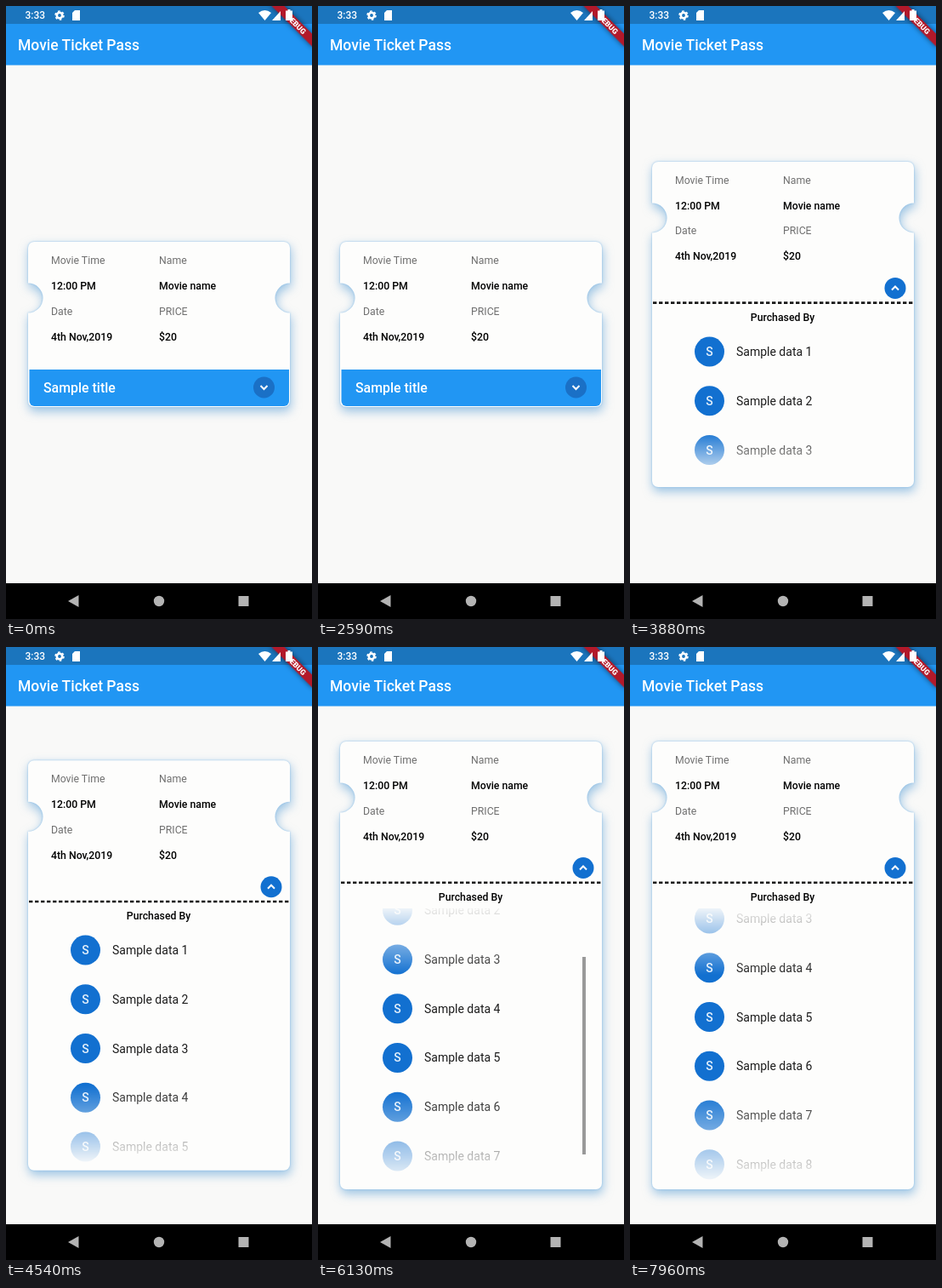
An HTML page that plays this animation: 360x720 px, repeating every 8000 ms.

```html
<!DOCTYPE html>
<html lang="en">
<head>
<meta charset="utf-8">
<title>Movie Ticket Pass</title>
<style>
  html, body { margin: 0; width: 100%; height: 100%; overflow: hidden; background: #f9f9f8; }
  svg { position: absolute; left: 0; top: 0; display: block; }
  text { font: 12.27px Roboto, sans-serif; }
  .label { fill: #707070; }
  .value { fill: #000; font-weight: 500; }
  #list { position: absolute; left: 44px; width: 272px; overflow: hidden; }
  #list text { font-size: 14px; fill: #1c1c1c; }
  #list .initial { fill: #e4f0fb; font-weight: 500; text-anchor: middle; }
  #card { filter: drop-shadow(0 0 1px #8fc0e8) drop-shadow(1px 5px 6px #3f8fd080); }
  #bar, #glow { position: absolute; }
  #bar { left: 310.5px; width: 4.5px; height: 232px; background: #999; }
</style>
</head>
<body>
<svg width="360" height="720" viewBox="0 0 360 720">
  <rect width="360" height="69.500" fill="#2196f3"/>
  <rect width="360" height="21" fill="#1b75bd"/>
  <text x="14" y="52" fill="#fff" style="font-size:17.5px;font-weight:500">Movie Ticket Pass</text>

  <g transform="translate(360 0) rotate(45)">
    <rect x="-35" y="23" width="70" height="10.5" fill="#b3192a" style="filter:drop-shadow(0 0 3px #0008)"/>
    <text x="2" y="31.500" text-anchor="middle" fill="#fff" style="font-size:8.9px;font-weight:900">DEBUG</text>
  </g>

  <g fill="#fff">
    <text x="22.5" y="15" style="font-size:12px;font-weight:500">3:33</text>
    <circle cx="63" cy="11" r="3.2" fill="none" stroke="#fff" stroke-width="2.6"/>
    <circle cx="63" cy="11" r="5" fill="none" stroke="#fff" stroke-width="1.6" stroke-dasharray="2.6 2.636"/>
    <path d="M81 5h6v12h-9V8z"/>
    <path d="M297 8q7.500-6 15 0l-7.500 9z"/>
    <path d="M323 6v11h-10z"/>
    <path d="M331.500 4h3v1.500h2.500V17h-8V5.500h2.500z"/>
  </g>

  <rect y="678" width="360" height="42"/>
  <g fill="#b4b4b4">
    <path d="M73 699l12.500-7v14z"/>
    <circle cx="180" cy="699" r="6.200"/>
    <rect x="273.500" y="693" width="12" height="12"/>
  </g>

  <path id="card" fill="#fdfdfc"/>

  <g id="ticket">
    <g id="info"></g>
    <g id="closed">
      <path d="M27.500 150H333V187a6 6 0 0 1-6 6H33.500a6 6 0 0 1-6-6z" fill="#2196f3"/>
      <text x="44" y="177" fill="#fff" style="font-size:15.9px;font-weight:500">Sample title</text>
      <circle cx="303.500" cy="171" r="12.500" fill="#1a70c6"/>
      <path d="M299.500 169l4 4 4-4" fill="none" stroke="#fff" stroke-width="2"/>
    </g>
    <g id="open">
      <circle cx="312" cy="148.500" r="12.500" fill="#1270d0"/>
      <path d="M308 150.500l4-4 4 4" fill="none" stroke="#fff" stroke-width="2"/>
      <path d="M27 165.700H333" stroke="#1a1a1a" stroke-width="2.600" stroke-dasharray="4.400 2.600"/>
      <text class="value" x="179.500" y="187" text-anchor="middle">Purchased By</text>
    </g>
  </g>
</svg>
<div id="list"><svg width="272" height="600"><g id="rows"></g></svg></div>
<svg id="glow" width="360" height="720"><path d="M44 632V616Q180 590 316 616V632z" fill="#2196f3"/></svg>
<div id="bar"></div>

<script>
const $ = id => document.getElementById(id);
const LOOP = 8000, MAX_SCROLL = 135, PITCH = 57.75;

const fields = [
  ['Movie Time', '12:00 PM', 53, 26], ['Name', 'Movie name', 180, 26],
  ['Date', '4th Nov,2019', 53, 85.5], ['PRICE', '$20', 180, 85.5]
];
$('info').innerHTML = fields.map(([label, value, x, y]) =>
  `<text class="label" x="${x}" y="${y}">${label}</text>
   <text class="value" x="${x}" y="${y + 30}">${value}</text>`).join('');

$('rows').innerHTML = Array.from({ length: 8 }, (_, i) => {
  const y = 27 + i * PITCH;
  return `<circle cx="49.5" cy="${y}" r="17.5" fill="#1270d0"/>
    <text class="initial" x="49.5" y="${y + 5}">S</text>
    <text x="81" y="${y + 5}">Sample data ${i + 1}</text>`;
}).join('');

const ramp = (t, from, to) => Math.min(1, Math.max(0, (t - from) / (to - from)));
const smooth = u => u * u * (3 - 2 * u);

// cubic-bezier(0, 0, .58, 1)
function easeOut(x) {
  let lo = 0, hi = 1;
  for (let i = 0; i < 24; i++) {
    const s = (lo + hi) / 2;
    if (1.74 * s * s - 0.74 * s ** 3 < x) lo = s; else hi = s;
  }
  return smooth(lo);
}

function cardPath(top, height) {
  const r = 7, notch = 17.5, above = 66 - notch - r, below = height - 66 - notch - r;
  return `M${26 + r} ${top}H${334 - r}a${r} ${r} 0 0 1 ${r} ${r}v${above}
    a${notch} ${notch} 0 0 0 0 ${2 * notch}v${below}a${r} ${r} 0 0 1 ${-r} ${r}
    H${26 + r}a${r} ${r} 0 0 1 ${-r} ${-r}v${-below}
    a${notch} ${notch} 0 0 0 0 ${-2 * notch}v${-above}a${r} ${r} 0 0 1 ${r} ${-r}z`;
}

function draw(t) {
  const grow = easeOut(ramp(t, 3003, 5218));
  const open = t >= 3003;
  const top = 277 - 166 * grow, height = 194 + 332 * grow;
  $('card').setAttribute('d', cardPath(top, height));
  $('ticket').setAttribute('transform', `translate(0 ${top})`);
  $('closed').style.display = open ? 'none' : '';
  $('open').style.display = open ? '' : 'none';

  const scroll = MAX_SCROLL * smooth(ramp(t, 5700, 6450)) - 4.5 * smooth(ramp(t, 6820, 7050));
  const listTop = top + 196, listHeight = Math.max(0, height - 201);
  const list = $('list').style;
  list.display = open ? '' : 'none';
  list.top = listTop + 'px';
  list.height = listHeight + 'px';
  const head = scroll > 0 ? 0.06 : 1, tail = scroll < MAX_SCROLL ? 0 : 1;
  list.maskImage = list.webkitMaskImage =
    `linear-gradient(rgba(0,0,0,${head}), #000 24%, #000 66%, rgba(0,0,0,${tail}))`;
  $('rows').setAttribute('transform', `translate(0 ${-scroll})`);

  $('glow').style.opacity = 0.11 * ramp(t, 6430, 6600) * (1 - ramp(t, 6800, 7000));
  $('bar').style.opacity = ramp(t, 5700, 5850) * (1 - ramp(t, 7600, 7900));
  $('bar').style.top = listTop + scroll / MAX_SCROLL * (listHeight - 232) + 'px';
}

function tick() {
  draw(performance.now() % LOOP);
  requestAnimationFrame(tick);
}
tick();
</script>
</body>
</html>
```
